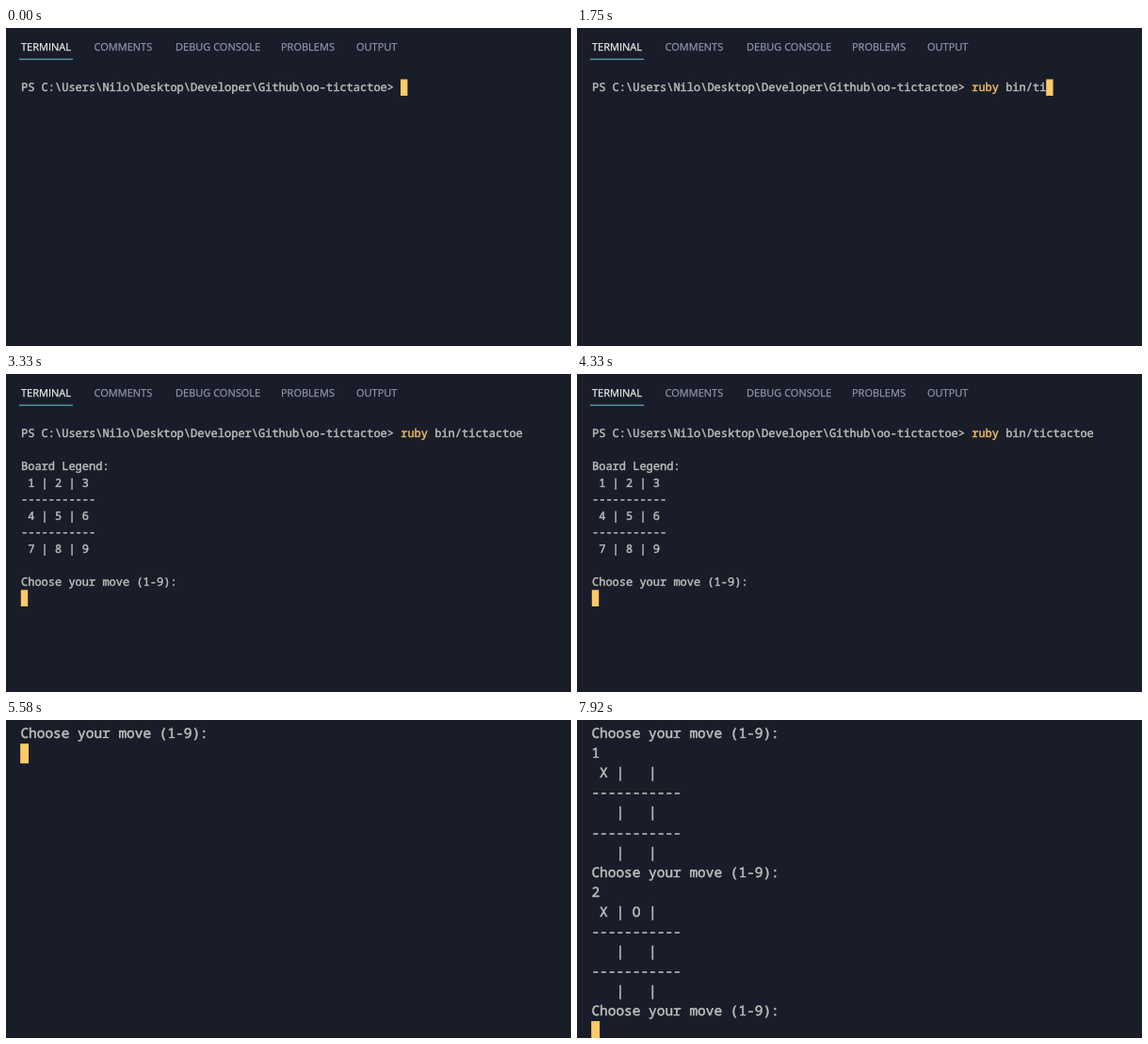
Recreate the animation shown at these times as an HTML page. Size 600 px wide and 338 px high, loop 8 s.

```html
<!DOCTYPE html>
<html lang="en">
<head>
<meta charset="utf-8">
<title>Terminal tic-tac-toe</title>
<style>
  html, body { margin: 0; width: 100%; height: 100%; overflow: hidden; background: #191d29; }
  svg { display: block; width: 100%; height: 100%; }
  text { white-space: pre; text-rendering: geometricPrecision; fill: var(--ink); stroke: var(--ink); }
  #tabs text { --ink: #8f93aa; font: 11px "Open Sans", "Noto Sans", sans-serif; stroke-width: 0.25; }
  #tabs .active { --ink: #ececec; }
  #screen text { --ink: #bcbdba; font: 500 12px "Noto Sans Mono", "DejaVu Sans Mono", monospace; stroke-width: 0.45; }
  #screen .command { --ink: #efbd5c; }
</style>
</head>
<body>
<svg viewBox="0 0 600 338">
  <rect width="600" height="338" fill="#191d29"/>
  <g id="tabs"></g>
  <g id="screen">
    <g id="lines"></g>
    <rect id="cursor" width="7.4" height="17.5" fill="#fdca67"/>
  </g>
</svg>
<script>
const LOOP = 8000, CELL = 7.2, ROW = 17.5, ZOOM = 1.204;
const PROMPT = "PS C:\\Users\\Nilo\\Desktop\\Developer\\Github\\oo-tictactoe> ";
const COMMAND = "ruby bin/tictactoe";
const ASK = "Choose your move (1-9):";
const KEYS = [330, 500, 580, 750, 910, 1170, 1250, 1420, 1500, 1590, 1670,
              1920, 2080, 2250, 2420, 2580, 2750, 2830];
const RUN = 3080, CUT = 5330;
const MOVES = [
  { key: "1", typed: 6080, enter: 6330, cells: "X        " },
  { key: "2", typed: 7250, enter: 7660, cells: "XO       " }
];

const $ = id => document.getElementById(id);
const tabs = $("tabs"), screen = $("screen"), lines = $("lines"), cursor = $("cursor");

function add(parent, name, attrs, content = "") {
  const el = document.createElementNS("http://www.w3.org/2000/svg", name);
  for (const key in attrs) el.setAttribute(key, attrs[key]);
  el.textContent = content;
  parent.appendChild(el);
  return el;
}

function board(cells) {
  const row = i => " " + [...cells.slice(i, i + 3)].join(" | ") + " ";
  const rule = "-".repeat(11);
  return [row(0), rule, row(3), rule, row(6)];
}

function shellLines(t) {
  const typed = COMMAND.slice(0, KEYS.filter(k => k <= t).length);
  const out = [PROMPT + typed];
  if (t >= RUN) out.push("", "Board Legend:", ...board("123456789"), "", ASK, "");
  return out;
}

function gameLines(t) {
  const out = [ASK, ""];
  for (const { key, typed, enter, cells } of MOVES) {
    if (t >= typed) out[out.length - 1] = key;
    if (t >= enter) out.push(...board(cells), ASK, "");
  }
  return out;
}

function drawLine(text, i) {
  const y = i * ROW + 12.6;
  if (!text.startsWith(PROMPT)) {
    add(lines, "text", { x: 0, y }, text);
    return;
  }
  const typed = text.slice(PROMPT.length);
  const split = Math.min(4, typed.length);
  const x = PROMPT.length * CELL;
  add(lines, "text", { x: 0, y }, PROMPT);
  add(lines, "text", { x, y, class: "command" }, typed.slice(0, split));
  add(lines, "text", { x: x + split * CELL, y }, typed.slice(split));
}

let shown = "";
function render(t) {
  const zoomed = t >= CUT;
  const content = zoomed ? gameLines(t) : shellLines(t);
  const state = zoomed + content.join("\n");
  if (state === shown) return;
  shown = state;

  tabs.style.display = zoomed ? "none" : "";
  screen.setAttribute("transform",
    zoomed ? `translate(15.4 4) scale(${ZOOM})` : "translate(16 54.5)");
  lines.replaceChildren();
  content.forEach(drawLine);
  const last = content.length - 1;
  cursor.setAttribute("x", content[last].length * CELL - 0.2);
  cursor.setAttribute("y", last * ROW);
}

[["TERMINAL", 16], ["COMMENTS", 93.5], ["DEBUG CONSOLE", 180], ["PROBLEMS", 292], ["OUTPUT", 372]]
  .forEach(([label, x], i) => add(tabs, "text", { x, y: 24.2, class: i ? "" : "active" }, label));
add(tabs, "rect", { x: 14, y: 32.6, width: 57, height: 1.2, fill: "#68aabd" });

const start = performance.now();
function tick() {
  render((performance.now() - start) % LOOP);
  requestAnimationFrame(tick);
}
tick();
</script>
</body>
</html>
```
